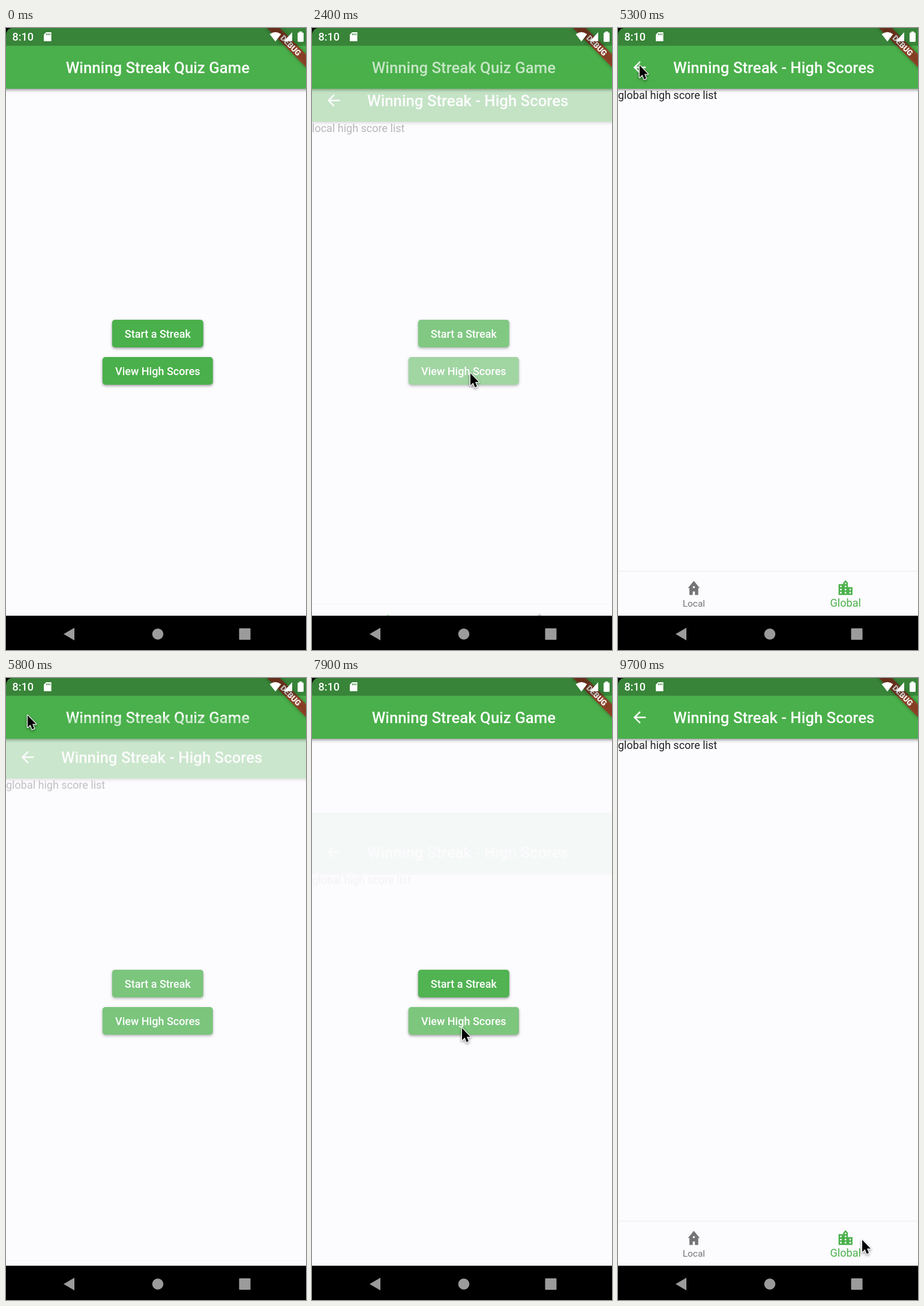
Write an HTML page with a canvas that moves like this. It is 500 by 1034 pixels and loops after 10000 ms.

```html
<!DOCTYPE html>
<html lang="en">
<head>
<meta charset="utf-8">
<title>Quiz app walkthrough</title>
<style>
  html, body { margin: 0; width: 100%; height: 100%; overflow: hidden; background: #000; }
  canvas { display: block; width: 100vw; height: 100vh; }
</style>
</head>
<body>
<canvas id="stage"></canvas>
<script>
const W = 500, H = 1034, LOOP = 10000, STEP = 100, LAST = 9700;
const DP = 1.288, PAGE_W = 505.6, MID = PAGE_W / 2, BAR_BOTTOM = 101, PAGE_BOTTOM = 977;
const GREEN = '#4ab04b', PAPER = '#fcfbfe', GREY = '#757477', INK = 'rgba(0,0,0,.87)';
const TITLE = 25.77, BODY = 18.03, SMALL = 15.46;

const PUSHES = [2250, 7850], POP = 5640, FADE = 300, TAB_TAP = 4300;

const ICONS = {
  back: 'M20 11H7.83l5.59-5.59L12 4l-8 8 8 8 1.41-1.41L7.83 13H20v-2z',
  local: 'M12 2.8L4.4 12H6.3V21H10.6V16.6H13.4V21H17.7V12H19.6ZM10.8 9.8H13.2V12H10.8Z',
  global: 'M15 11V5l-3-3-3 3v2H3v14h18V11h-6zm-8 8H5v-2h2v2zm0-4H5v-2h2v2zm0-4H5V9h2v2z' +
    'm6 8h-2v-2h2v2zm0-4h-2v-2h2v2zm0-4h-2V9h2v2zm0-4h-2V5h2v2zm6 12h-2v-2h2v2zm0-4h-2v-2h2v2z'
};
for (const k in ICONS) ICONS[k] = new Path2D(ICONS[k]);

const CURSOR = new Path2D('M0 0V20L4.6 15.8L7.6 23.2L11 21.8L8 14.6H14Z');

// Pointer stops: time, x, y
const STOPS = [
  [100, 512, 330], [1100, 290, 520], [1700, 300, 628], [2100, 264, 574],
  [3500, 264, 574], [4200, 378, 957], [4600, 378, 957], [5300, 36, 62],
  [6100, 36, 62], [7000, 250, 582], [8100, 250, 582], [8700, 331, 822],
  [9200, 386, 964], [9600, 407, 934], [LOOP, 407, 934]
];

const stage = document.getElementById('stage');
const layer = document.createElement('canvas');
const dpr = window.devicePixelRatio || 1;
for (const c of [stage, layer]) {
  c.width = W * dpr;
  c.height = H * dpr;
}
const screen = stage.getContext('2d'), sheet = layer.getContext('2d');

const clamp = v => Math.max(0, Math.min(1, v));
const mix = (a, b, p) => a + (b - a) * p;

function bezier(x1, y1, x2, y2) {
  const at = (a, b, s) => 3 * (1 - s) ** 2 * s * a + 3 * (1 - s) * s * s * b + s ** 3;
  return x => {
    if (x <= 0 || x >= 1) return clamp(x);
    let lo = 0, hi = 1;
    for (let i = 0; i < 24; i++) {
      const s = (lo + hi) / 2;
      if (at(x1, x2, s) < x) lo = s; else hi = s;
    }
    return at(y1, y2, lo);
  };
}
const slideEase = bezier(.4, 0, .2, 1);
const fadeEase = bezier(.42, 0, 1, 1);

function text(g, str, x, y, size, color, weight = 400, align = 'left') {
  g.font = `${weight} ${size}px Roboto, sans-serif`;
  g.textAlign = align;
  g.fillStyle = color;
  g.fillText(str, x, y);
}

function icon(g, path, cx, cy, color) {
  g.save();
  g.translate(cx - 12 * DP, cy - 12 * DP);
  g.scale(DP, DP);
  g.fillStyle = color;
  g.fill(path, 'evenodd');
  g.restore();
}

function shape(g, color, points) {
  g.fillStyle = color;
  g.beginPath();
  points.forEach(([x, y]) => g.lineTo(x, y));
  g.fill();
}

function roundRect(g, color, x, y, w, h, r) {
  g.fillStyle = color;
  g.beginPath();
  g.roundRect(x, y, w, h, r);
  g.fill();
}

function raised(g, alpha, blur, drop, draw) {
  g.save();
  g.shadowColor = `rgba(0,0,0,${alpha})`;
  g.shadowBlur = blur * dpr;
  g.shadowOffsetY = drop * dpr;
  draw();
  g.restore();
}

function paper(g) {
  g.fillStyle = PAPER;
  g.fillRect(0, 0, W, PAGE_BOTTOM);
}

function appBar(g) {
  raised(g, .42, 5, 2, () => {
    g.fillStyle = GREEN;
    g.fillRect(-20, -20, W + 40, BAR_BOTTOM + 20);
  });
}

function button(g, label, y, w, glow) {
  const x = MID - w / 2;
  raised(g, .38, 4, 2, () => roundRect(g, GREEN, x, y, w, 46, 5));
  if (glow) roundRect(g, `rgba(255,255,255,${glow})`, x, y, w, 46, 5);
  text(g, label, MID, y + 29.7, BODY, '#fff', 500, 'center');
}

function homePage(g, glow) {
  paper(g);
  appBar(g);
  text(g, 'Winning Streak Quiz Game', MID, 75.3, TITLE, '#fff', 500, 'center');
  button(g, 'Start a Streak', 485, 152, 0);
  button(g, 'View High Scores', 547, 184, glow);
}

function tab(g, label, path, cx, p) {
  const c = [[117, 74], [116, 176], [119, 75]].map(([a, b]) => Math.round(mix(a, b, p)));
  const color = `rgb(${c})`;
  icon(g, path, cx, 930.9, color);
  text(g, label, cx, 962.4, mix(SMALL, BODY, p), color, 400, 'center');
}

function scoresPage(g, tabPos) {
  paper(g);
  appBar(g);
  icon(g, ICONS.back, 36, 65.5, '#fff');
  text(g, 'Winning Streak - High Scores', 92, 75.3, TITLE, '#fff', 500);
  text(g, (tabPos > 0 ? 'global' : 'local') + ' high score list', 0, 118, BODY, INK);
  raised(g, .07, 3, -1, () => {
    g.fillStyle = PAPER;
    g.fillRect(-20, 904, W + 40, 90);
  });
  tab(g, 'Local', ICONS.local, PAGE_W / 4, 1 - tabPos);
  tab(g, 'Global', ICONS.global, PAGE_W * 3 / 4, tabPos);
}

function debugBanner(g) {
  g.save();
  g.translate(PAGE_W, -2);
  g.rotate(Math.PI / 4);
  raised(g, .5, 6, 0, () => {
    g.fillStyle = 'rgba(183,28,28,.63)';
    g.fillRect(-40 * DP, 28 * DP, 80 * DP, 12 * DP);
  });
  text(g, 'DEBUG', 0, 34 * DP + 4.7, 10.2 * DP, '#fff', 900, 'center');
  g.restore();
}

function statusBar(g) {
  g.fillStyle = 'rgba(0,0,0,.25)';
  g.fillRect(0, 0, W, 29.5);
  text(g, '8:10', 10.5, 21, BODY, '#fff', 500);

  // Memory card
  shape(g, '#fff', [[67, 7], [75.5, 7], [75.5, 22], [63, 22], [63, 11]]);
  g.fillStyle = '#388539';
  for (let i = 0; i < 3; i++) g.fillRect(67 + i * 2.7, 9, 1.3, 3);

  // Wi-Fi, signal, battery
  g.fillStyle = '#fff';
  g.beginPath();
  g.moveTo(449, 22.5);
  g.lineTo(439.5, 10.3);
  g.quadraticCurveTo(449, 3, 458.5, 10.3);
  g.fill();
  shape(g, '#fff', [[477, 7], [477, 22], [463, 22]]);
  roundRect(g, '#fff', 486, 7.5, 10, 15.5, 1.5);
  g.fillRect(488.7, 5.8, 4.6, 2);

  // Rounded screen corner
  g.fillStyle = '#000';
  g.beginPath();
  g.moveTo(0, 0);
  g.lineTo(10, 0);
  g.quadraticCurveTo(1, 1, 0, 11);
  g.fill();
}

function navBar(g) {
  g.fillStyle = '#000';
  g.fillRect(0, PAGE_BOTTOM, W, H - PAGE_BOTTOM);
  const grey = '#9b9b9b';
  shape(g, grey, [[96, 1007.5], [114, 997], [114, 1018]]);
  g.beginPath();
  g.arc(253, 1007.5, 9.3, 0, 7);
  g.fill();
  roundRect(g, grey, 388.5, 998, 19, 19, 1);
}

function pointer(g, t) {
  if (t < STOPS[0][0]) return;
  const i = STOPS.findIndex(s => s[0] > t);
  const [t0, x0, y0] = STOPS[i - 1], [t1, x1, y1] = STOPS[i];
  const p = (t - t0) / (t1 - t0), e = p * p * (3 - 2 * p);
  g.save();
  g.translate(mix(x0, x1, e), mix(y0, y1, e));
  g.lineJoin = 'round';
  g.lineWidth = 2.4;
  g.strokeStyle = '#fff';
  raised(g, .45, 4, 2, () => g.stroke(CURSOR));
  g.fillStyle = '#000';
  g.fill(CURSOR);
  g.restore();
}

// How far the scores page has come in, 0 to 1
function pageProgress(t) {
  if (t >= PUSHES[1]) return clamp((t - PUSHES[1]) / FADE);
  if (t >= POP) return 1 - clamp((t - POP) / FADE);
  return clamp((t - PUSHES[0]) / FADE);
}

function buttonGlow(t) {
  const start = PUSHES.find(s => t > s - 150 && t < s + 500);
  return start ? .25 * clamp((t - start + 150) / 200) : 0;
}

function render(t) {
  screen.setTransform(dpr, 0, 0, dpr, 0, 0);
  sheet.setTransform(dpr, 0, 0, dpr, 0, 0);
  const p = pageProgress(t);
  homePage(screen, buttonGlow(t));
  if (p > 0) {
    sheet.clearRect(0, 0, W, H);
    scoresPage(sheet, slideEase(clamp((t - TAB_TAP + 100) / 200)));
    screen.save();
    screen.globalAlpha = fadeEase(p);
    screen.drawImage(layer, 0, (1 - slideEase(p)) * 245, W, H);
    screen.restore();
  }
  debugBanner(screen);
  statusBar(screen);
  navBar(screen);
  pointer(screen, t);
}

const began = performance.now();
function tick() {
  const t = (performance.now() - began) % LOOP;
  render(Math.min(LAST, Math.floor(t / STEP) * STEP));
  requestAnimationFrame(tick);
}
tick();
</script>
</body>
</html>
```
